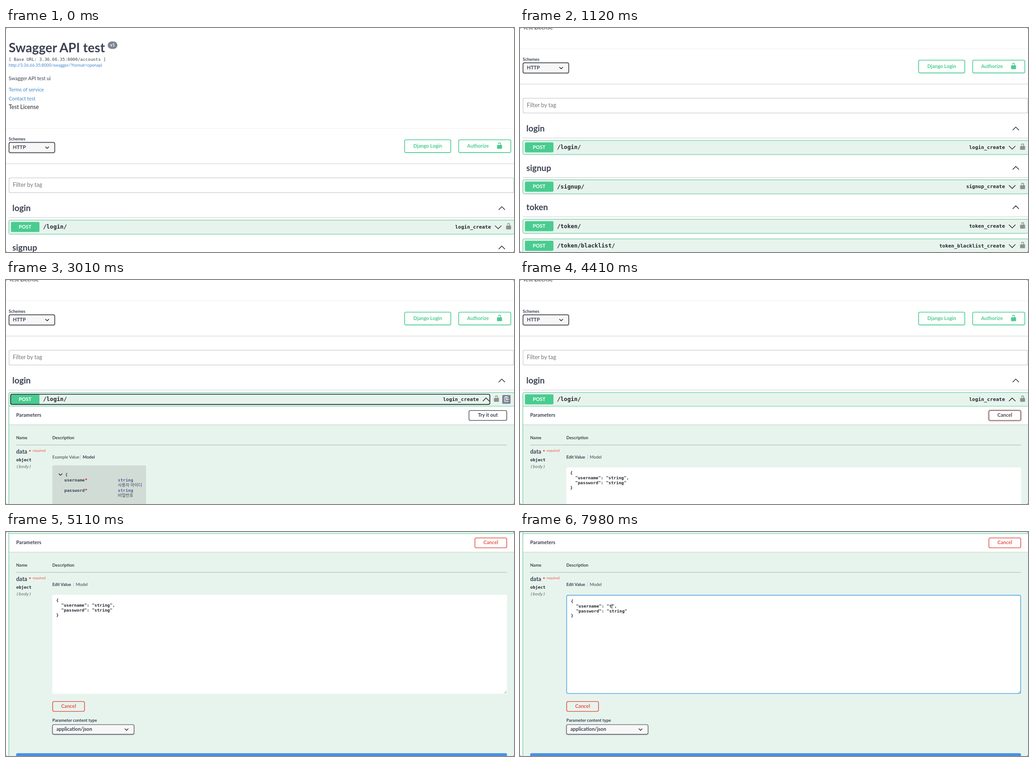
Animation of 1124 by 498 pixels, one loop 8000 ms. Source, as an HTML page:

```html
<!DOCTYPE html>
<html lang="en">
<head>
<meta charset="utf-8">
<title>API docs</title>
<style>
html, body { margin: 0; width: 100%; height: 100%; overflow: hidden; background: #fff; }
#stage { display: block; width: 1124px; height: 498px; }
text { font-family: Lato, "Noto Sans CJK KR", "Noto Sans CJK", sans-serif; white-space: pre; }
.b { font-weight: 700; }
.i { font-style: italic; }
.m { font-family: "DejaVu Sans Mono", "Liberation Mono", monospace; }
.row { filter: drop-shadow(0 0 1px rgba(0, 0, 0, .19)); }
.select { filter: drop-shadow(0 1px 1px rgba(0, 0, 0, .25)); }
.bar { filter: drop-shadow(0 1px 1px rgba(0, 0, 0, .13)); }
</style>
</head>
<body>
<svg id="stage" viewBox="0 0 1124 498"></svg>
<script>
const ZOOM = 0.784, LOOP = 8000, TICK = 70;
const INK = '#3b4151', CODE = '#23272f', GREEN = '#49cc90', MINT = '#e7f4ed', RED = '#e5574f', LINK = '#3f87cc';
const CHAR = 12 * ZOOM * 0.602;

// Drawing helpers; font sizes are page pixels before zoom
const text = (x, y, str, px, cls = '', fill = INK, extra = '') =>
  `<text x="${x}" y="${y}" font-size="${px * ZOOM}" class="${cls}" fill="${fill}" ${extra}>${str}</text>`;
const mid = 'text-anchor="middle"', end = 'text-anchor="end"';
const rect = (x, y, w, h, fill, extra = '') =>
  `<rect x="${x}" y="${y}" width="${w}" height="${h}" fill="${fill}" ${extra}/>`;
const line = (x1, x2, y, color, w = 0.9) =>
  `<path d="M${x1} ${y}H${x2}" stroke="${color}" stroke-width="${w}"/>`;
const chevron = (x, y, w, h, width = 1.3, id = '') =>
  `<path ${id} d="M${x - w} ${y - h}L${x} ${y + h}L${x + w} ${y - h}" fill="none" stroke="#111" stroke-width="${width}" stroke-linejoin="round" stroke-linecap="round"/>`;
const lock = (x, y, color) =>
  `<g transform="translate(${x - 7.84} ${y - 7.84}) scale(${ZOOM})"><rect x="3" y="8" width="14" height="11" rx="1.6" fill="${color}"/>
   <path d="M7 5.8V5.2C7 3 8 2 10 2s3 1 3 3.2V9" fill="none" stroke="${color}" stroke-width="2"/></g>`;
const button = (x, y, w, h, label, color, labelX = x + w / 2, fill = 'none') =>
  rect(x, y, w, h, fill, `rx="3" stroke="${color}" stroke-width="1.6"`) +
  text(labelX, y + h / 2 + 2.9, label, 14, 'b', color, mid);
const select = (x, y, w, h, label, border) =>
  rect(x, y, w, h, '#f7f7f7', `rx="3" stroke="#41444e" stroke-width="${border}" class="select"`) +
  text(x + 8.6, y + h / 2 + 3.4, label, 14, 'b') +
  chevron(x + w - 16.6, y + h / 2 + 0.3, 3.6, 1.8);

const section = (name, y) =>
  text(14, y + 6.5, name, 24, 'b') + chevron(1097, y, 6.5, -3.3) + line(6, 1124, y + 21.3, '#c6c9cd', 1);
const badge = (path, y) =>
  rect(11, y - 11, 63, 22.4, GREEN, 'rx="2.4"') +
  text(42.3, y + 3.6, 'POST', 14, 'b', '#fff', mid) + text(82, y + 4.2, path, 16, 'm b', CODE);
const actions = (op, y, id = '') =>
  text(1073, y + 3.5, op, 14, 'm b', CODE, end) + chevron(1089, y + 0.8, 6.8, 3.4, 1.3, id) +
  lock(1112, y - 1.5, '#8b938f');
const box = (y, h) =>
  rect(6.4, y - 15, 1118.2, h, MINT, `rx="3" stroke="${GREEN}" stroke-width=".9" class="row"`);
const row = (path, op, y) => box(y, 31) + badge(path, y) + actions(op, y);

const header = () =>
  text(6, 54.2, 'Swagger API test', 36, 'b') +
  rect(225, 30, 21.5, 16.5, '#7d8492', 'rx="8.2"') + text(235.8, 41.3, 'v1', 12, 'b', '#fff', mid) +
  text(6, 72.8, '[ Base URL: 3.36.66.35:8000/accounts ]', 12, 'm') +
  text(6, 86.3, 'http://3.36.66.35:8000/swagger/?format=openapi', 12, '', LINK) +
  text(6, 115.8, 'Swagger API test ui', 14) +
  text(6, 141.4, 'Terms of service', 14, '', LINK) +
  text(6, 160.6, 'Contact test', 14, '', LINK) +
  text(6, 180, 'Test License', 16, '', '#24272e') +
  line(0, 1124, 223.4, '#ececec') + line(0, 1124, 301.6, '#d6d6d6', 1.4) +
  text(6, 250.2, 'Schemes', 12, 'b') + select(6.7, 254.4, 101, 22.6, 'HTTP', 1.6) +
  button(882, 248.5, 102.2, 28.4, 'Django Login', GREEN) +
  button(1001.5, 248.5, 115.4, 28.4, 'Authorize', GREEN, 1044.3) + lock(1092, 261.5, GREEN) +
  rect(6.7, 333.3, 1116.8, 32.8, '#fff', 'rx="2.5" stroke="#d0d3d8" stroke-width="1.5"') +
  text(15, 353.2, 'Filter by tag', 16, '', '#757575');

const rest = () =>
  section('signup', 488) + row('/signup/', 'signup_create', 529.6) +
  section('token', 575.5) + row('/token/', 'token_create', 617.4) +
  row('/token/blacklist/', 'token_blacklist_create', 661);

const tabs = (first, second, firstBold, sepX) =>
  text(102.5, 573.6, first, 12, firstBold ? 'b' : '') +
  `<path d="M${sepX} 565V575.5" stroke="#b9c6c0" stroke-width=".9"/>` +
  text(sepX + 5, 573.6, second, 12, firstBold ? '' : 'b');

const field = (name, note, y) =>
  text(129, y, name, 12, 'm b') + text(174.6, y, '*', 12, 'm b', '#f00') +
  text(247.5, y, 'string', 12, 'm b', '#4f5f96') + text(247.5, y + 11, note, 11.8);

const model = () =>
  tabs('Example Value', 'Model', false, 164.7) +
  rect(102.5, 589, 207.5, 200, '#d1dcd6', 'rx="3"') +
  chevron(120.6, 609.6, 3.6, 1.8) + text(131, 613, '{', 12, 'm b') +
  field('username', '사용자 아이디', 625) + field('password', '비밀번호', 647.6);

const editor = () =>
  tabs('Edit Value', 'Model', true, 149.4) +
  rect(102.5, 593.8, 1006, 220, '#fff', 'rx="3" id="area"') +
  '<path d="M1102.5 812.5L1107.5 807.5M1105.5 812.5L1107.5 810.5" stroke="#666" stroke-width=".8"/>' +
  `<g id="code">${rect(111 + 15 * CHAR, 612, 6 * CHAR, 11.2, '#b3d7ff', 'id="mark"')}` +
  ['{', '', '  "password": "string"', '}'].map((s, i) =>
    text(111, 609.3 + i * 10.85, s, 12, 'm b', CODE, `id="code${i}"`)).join('') +
  rect(111 + 16 * CHAR - 0.3, 612, 0.9, 11, '#111', 'id="caret"') + '</g>' +
  button(103.3, 830.8, 70.4, 22, 'Cancel', RED) +
  text(102.5, 875.8, 'Parameter content type', 12, 'b') +
  select(102.9, 882.2, 180.4, 21.4, 'application/json', 1.1) +
  rect(22.5, 945.8, 1086, 31, '#4990e2', 'rx="3"');

const details = () =>
  rect(6.9, 458, 1117.1, 40, '#fff', 'class="bar"') + line(6.4, 1124, 457.7, GREEN) +
  text(22.5, 481.1, 'Parameters', 14, 'b') +
  `<g id="toggle">${button(1037.5, 467.3, 70.4, 22, '', INK, 0, '#fff')}</g>` +
  text(22.5, 531, 'Name', 12, 'b') + text(102.5, 531, 'Description', 12, 'b') +
  line(22.5, 1108.5, 543.8, '#9fabaa') +
  text(22.5, 563.4, 'data', 16, 'b') + '<circle cx="53" cy="556.6" r="1.7" fill="#f0322f"/>' +
  text(59, 558.8, 'required', 10, '', '#f0524f') +
  text(22.5, 580.2, 'object', 12, 'm b', CODE) + text(22.5, 595.2, '(body)', 12, 'm i', '#5f6967') +
  `<g id="model">${model()}</g><g id="editor">${editor()}</g>`;

const copy =
  `<svg id="copy" y="432.4" height="20" overflow="hidden"><rect width="100%" height="100%" rx="3" fill="#7d8492"/>
   <g id="clip" fill="none" stroke="#fff" stroke-width="1.1"><path d="M3.5 7V5H-4V15H3.5V13"/><path d="M-2 5V4H1.6V5M-2.4 8H1.4M-2.4 12H-1"/><path d="M6 10H0M2 8L0 10L2 12"/></g></svg>`;

const corner = (x, y, sx, sy) =>
  `<path transform="translate(${x} ${y}) scale(${sx} ${sy})" d="M0 0H3Q0 0 0 3Z" fill="#555"/>`;

document.getElementById('stage').innerHTML =
  `<g id="page">${header()}${section('login', 400.4)}<g id="rest">${rest()}</g>` +
  `<g id="shut">${box(442.2, 31)}</g><g id="open">${box(442.2, 1500)}${details()}</g>` +
  badge('/login/', 442.2) + `<g id="acts">${actions('login_create', 442.2, 'id="arrow"')}</g>` +
  rect(10.3, 431, 0, 22.6, 'none', 'id="ring" rx="3" stroke="#1d2229" stroke-width="1.7"') + copy + '</g>' +
  corner(0, 0, 1, 1) + corner(1124, 0, -1, 1) + corner(0, 498, 1, -1) + corner(1124, 498, -1, -1);

const $ = id => document.getElementById(id);
const set = (el, attrs) => { for (const k in attrs) el.setAttribute(k, attrs[k]); };
const show = (id, on) => { $(id).style.display = on ? '' : 'none'; };
const clamp = x => Math.min(1, Math.max(0, x));
const smooth = x => { x = clamp(x); return x * x * (3 - 2 * x); };

// The CSS "ease" curve
function ease(x) {
  x = clamp(x);
  let lo = 0, hi = 1, s = 0.5;
  for (let i = 0; i < 20; i++) {
    s = (lo + hi) / 2;
    if (0.75 * s * (1 - s) + s ** 3 < x) lo = s; else hi = s;
  }
  return 0.3 * s * (1 - s) ** 2 + 3 * s * s * (1 - s) + s ** 3;
}
const blend = (a, b, p) => `rgb(${a.map((v, i) => Math.round(v + (b[i] - v) * p))})`;

const toggleBox = $('toggle').querySelector('rect');
const toggleLabel = $('toggle').querySelector('text');

function render(time) {
  const t = Math.floor(time / TICK) * TICK;
  const scroll = 177 * smooth((t - 630) / 490) + 277 * smooth((t - 4698) / 412);
  set($('page'), { transform: `translate(0 ${-scroll})` });

  const open = t >= 2870, editing = t >= 4270, focused = t >= 6720, typed = t >= 7980;
  show('rest', !open);
  show('shut', !open);
  show('open', open);
  show('model', !editing);
  show('editor', editing);

  // Copy button slides in while the row is hovered
  const hover = ease((t - 1990) / 530) - ease((t - 3250) / 530);
  const width = 18.8 * hover;
  set($('acts'), { transform: `translate(${-26.8 * hover} 0)` });
  set($('arrow'), { transform: open ? 'matrix(1 0 0 -1 0 885.6)' : '' });
  set($('copy'), { x: 1120.5 - 3.9 * hover - width, width });
  set($('clip'), { transform: `translate(${width / 2} 0)` });
  show('copy', width > 0.05);
  set($('ring'), { width: 1087 - 26.8 * hover });
  show('ring', t >= 2800 && !editing);

  // Try it out turns into Cancel
  const tint = ease((t - 4340) / 300);
  const glow = t < 4130 ? 0 : 0.4 * (1 - clamp((t - 4480) / 210));
  const w = editing ? 70.4 : 83.5;
  set(toggleBox, { x: 1107.9 - w, width: w, stroke: blend([88, 91, 98], [229, 87, 79], clamp(tint * 1.15)) });
  toggleBox.style.filter = glow ? `drop-shadow(0 0 2px rgba(0,0,0,${glow}))` : 'none';
  set(toggleLabel, { x: 1107.9 - w / 2, fill: blend([59, 65, 81], [229, 87, 79], tint * tint) });
  toggleLabel.textContent = editing ? 'Cancel' : 'Try it out';

  set($('area'), focused
    ? { x: 103.3, y: 594.6, width: 1004.4, height: 218.4, stroke: '#58a9e0', 'stroke-width': 1.6 }
    : { x: 102.5, y: 593.8, width: 1006, height: 220, stroke: 'none' });
  set($('code'), { transform: focused ? 'translate(1.6 1.6)' : '' });
  $('code1').textContent = `  "username": "${typed ? 't' : 'string'}",`;
  show('mark', t >= 6930 && !typed);
  show('caret', typed);
}

function loop() {
  render(performance.now() % LOOP);
  requestAnimationFrame(loop);
}
loop();
</script>
</body>
</html>
```
